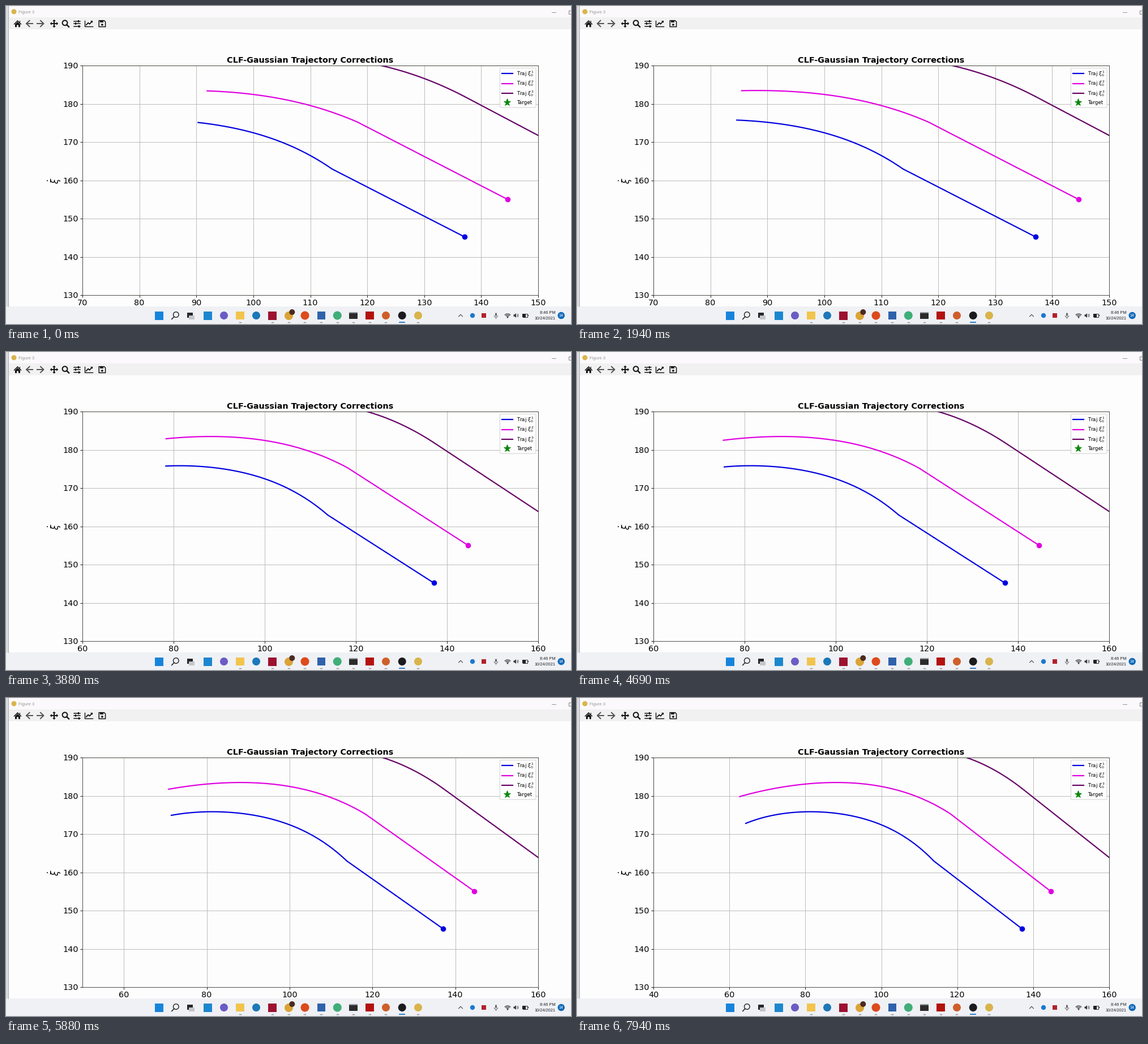
Write a matplotlib script that moves like this. It is 998x561 px and loops after 8 s.

```python
import matplotlib.pyplot as plt
import numpy as np
from matplotlib.animation import FuncAnimation
from matplotlib.patches import Arc, Circle, FancyBboxPatch, Polygon, Rectangle

W, H, DPI = 998, 561, 64
PT = 72 / DPI  # points per pixel
FRAMES, INTERVAL = 128, 62.5
BLUE, PINK, PLUM = "#0000e0", "#e000e0", "#660066"
INK = "#111111"

plt.rcParams["font.family"] = "DejaVu Sans"
fig = plt.figure(figsize=(W / DPI, H / DPI), dpi=DPI, facecolor="#fdfdfd")


def pixel_axes(z):
    a = fig.add_axes([0, 0, 1, 1], zorder=z)
    a.set_xlim(0, W)
    a.set_ylim(H, 0)
    a.axis("off")
    return a


ui, top = pixel_axes(0), pixel_axes(2)


def rect(x, y, w, h, color, a=ui):
    a.add_patch(Rectangle((x, y), w, h, fc=color, ec="none"))


def dot(x, y, r, color):
    ui.add_patch(Circle((x, y), r, fc=color, ec="none"))


def square(x, y, s, color):
    rect(x - s / 2, y - s / 2, s, s, color)


def poly(pts, color=INK):
    ui.add_patch(Polygon(pts, closed=True, fc=color, ec="none"))


def line(pts, color=INK, w=1.0, a=ui):
    xs, ys = zip(*pts)
    a.plot(xs, ys, color=color, lw=w * PT)


def ring(x, y, r, color=INK, w=1.0):
    ui.add_patch(Circle((x, y), r, fc="none", ec=color, lw=w * PT))


def label(x, y, s, size, color=INK, a=ui, **kw):
    kw.setdefault("va", "baseline")
    a.text(x, y, s, fontsize=size * PT, color=color, **kw)


def draw_window():
    rect(0, 0, 4.5, 530, "#d9dbdf")
    line([(4.5, 0), (4.5, 530)], "#a9abad", 1)
    rect(5, 0, W - 5, 20, "#fbf9fb")
    rect(5, 20, W - 5, 21, "#f2f1f2")
    dot(14, 10, 4.5, "#d9b44a")
    label(22, 13, "Figure 3", 7.6, "#9a9a9a", family="Liberation Sans")
    line([(964, 10.5), (971, 10.5)], "#8c8c8c", 0.9)
    ui.add_patch(Rectangle((994.5, 7.5), 6, 6, fc="none", ec="#777777", lw=0.9 * PT))


def draw_toolbar():
    # home
    poly([(13.5, 32), (20.5, 25), (27.5, 32), (26.5, 33), (20.5, 27.2), (14.5, 33)])
    poly([(16, 32.2), (20.5, 28), (25, 32.2), (25, 37.2), (22, 37.2),
          (22, 33.5), (19, 33.5), (19, 37.2), (16, 37.2)])
    rect(23.6, 26, 1.8, 4, INK)
    # back and forward
    for x, d in ((36, 1), (66.5, -1)):
        line([(x, 31), (x + 11 * d, 31)], "#555555", 2)
        line([(x + 5.5 * d, 25.8), (x, 31), (x + 5.5 * d, 36.2)], "#555555", 2)
    # pan
    line([(80, 31), (90, 31)], w=2)
    line([(85, 26), (85, 36)], w=2)
    for ux, uy in ((1, 0), (-1, 0), (0, 1), (0, -1)):
        poly([(85 + 7.2 * ux, 31 + 7.2 * uy),
              (85 + 4.3 * ux + 3 * uy, 31 + 4.3 * uy + 3 * ux),
              (85 + 4.3 * ux - 3 * uy, 31 + 4.3 * uy - 3 * ux)])
    # zoom
    ring(104, 29.8, 4.4, w=2)
    line([(107.5, 33.3), (111, 36.8)], w=2.4)
    # sliders
    for y, x in ((26.8, 128), (31.2, 123), (35.6, 129)):
        line([(119.8, y), (131.5, y)], w=1.5)
        rect(x - 1.3, y - 2, 2.6, 4, INK)
    # chart
    line([(139.5, 25.5), (139.5, 36.3), (153, 36.3)], w=1.4)
    line([(141.8, 33.3), (145.2, 29.6), (147.6, 31.8), (152, 27)], w=1.8)
    poly([(149.5, 25.8), (153.3, 25.8), (153.3, 29.6)])
    # save
    ui.add_patch(Polygon([(164.2, 25.7), (173.4, 25.7), (175.6, 28), (175.6, 36.6), (164.2, 36.6)],
                         closed=True, fc="none", ec=INK, lw=1.5 * PT))
    rect(166, 26, 6, 3.4, INK)
    dot(169.9, 33, 1.8, INK)


def draw_taskbar():
    rect(0, 530, W, H - 530, "#eff1f5")
    y = 546
    square(270.5, y, 15, "#1784dc")
    ring(300.3, 544.5, 4.8, "#222222", 1.4)
    line([(296.8, 548.2), (292.8, 552.4)], "#222222", 1.6)
    rect(320, 541, 10.5, 9, "#262626")
    rect(323.5, 545.5, 9.5, 7, "#c4c6ca")
    square(356.5, y, 15, "#1c87cf")
    dot(385, y, 7, "#6a5cc4")
    square(413.5, y, 14.5, "#f2c44e")
    dot(442, y, 7, "#1c78b8")
    square(470.8, y, 15, "#9c1230")
    dot(499.5, y + 0.5, 7.5, "#dba437")
    dot(505.3, 540, 5, "#4a2a22")
    dot(528, y, 7.5, "#dd4a1c")
    square(556.8, y, 14, "#2f62ab")
    dot(585.3, y, 7.5, "#3fae78")
    rect(606, 540, 15.5, 12, "#2b2b2b")
    rect(606, 540, 15.5, 2, "#8f9296")
    square(642.3, y, 14.5, "#b3120e")
    dot(671, y, 7, "#cf5f2a")
    dot(699.7, y, 7, "#1b1b1d")
    dot(728, y, 7, "#d9b44a")
    for x in (413.5, 471, 499.5, 528, 556.8, 585.3, 613.7, 642.3, 671, 728):
        line([(x - 1.5, 558), (x + 1.5, 558)], "#8a8c90", 1.4)
    line([(695.5, 558), (704, 558)], "#1a6fc4", 1.8)


def draw_tray():
    line([(799.5, 547.8), (803, 544.2), (806.5, 547.8)], "#333333", 1)
    dot(824, 546, 4.2, "#1a78d0")
    square(844, 546, 8, "#b3202c")
    # microphone
    ui.add_patch(FancyBboxPatch((864.6, 542), 1.8, 4.4, boxstyle="round,pad=0.4",
                                fc="#555555", ec="none"))
    ui.add_patch(Arc((865.5, 546), 6.4, 6.4, theta1=0, theta2=180, ec="#555555", lw=0.9 * PT))
    line([(865.5, 549.2), (865.5, 551)], "#555555", 0.9)
    # wireless
    for d in (5, 9.5, 14):
        ui.add_patch(Arc((886, 550), d, d, theta1=222, theta2=318, ec="#222222", lw=1.1 * PT))
    dot(886, 549.5, 1.1, "#222222")
    # speaker
    poly([(896.5, 544.5), (898.3, 544.5), (901, 542), (901, 550), (898.3, 547.6), (896.5, 547.6)],
         "#333333")
    for d in (4.5, 8):
        ui.add_patch(Arc((901, 546), d, d, theta1=-50, theta2=50, ec="#444444", lw=0.8 * PT))
    # battery
    ui.add_patch(Rectangle((913, 543.2), 8.2, 5.4, fc="none", ec="#222222", lw=0.9 * PT))
    rect(912.5, 542.7, 5.5, 6.3, "#222222")
    rect(921.6, 544.8, 1.1, 2.2, "#222222")
    sans = dict(family="Liberation Sans", ha="right")
    label(970.5, 542.8, "8:46 PM", 7.4, "#222222", **sans)
    label(970.5, 552.8, "10/24/2021", 7.4, "#222222", **sans)
    dot(980.7, 546, 6.2, "#0f68b8")
    label(980.7, 546, "14", 6.8, "white", family="Liberation Sans", ha="center",
          va="center_baseline")


def draw_legend():
    top.add_patch(FancyBboxPatch((874.2, 111.2), 60, 66, boxstyle="round,pad=1.8",
                                 fc=(1, 1, 1, 0.85), ec="#cccccc", lw=0.9 * PT))
    for i, (y, color) in enumerate(((119.2, BLUE), (136.8, PINK), (154.4, PLUM)), 1):
        line([(876, y), (895, y)], color, 2.2, top)
        label(902, y + 3, rf"Traj $\xi_0^{i}$", 8.8, "black", top)
    top.plot(885.5, 170, "*", color="#0a870a", ms=13.5 * PT, mec="#0a870a", mew=0.8 * PT)
    label(902, 173.2, "Target", 8.8, "black", top)


draw_window()
draw_toolbar()
draw_taskbar()
draw_tray()
draw_legend()
label(537.5, 99.7, "CLF-Gaussian Trajectory Corrections", 14.4, "black", top,
      weight="bold", ha="center")
label(86, 308, r"$\dot{\xi}$", 16.5, "black", top, rotation=90, ha="center", va="center")

ax = fig.add_axes([135 / W, 1 - 510 / H, 805 / W, 405 / H], zorder=1, facecolor="none")
ax.set_ylim(130, 190)
ax.set_yticks(range(130, 191, 10))
ax.grid(color="#b6b6b4", lw=0.9 * PT)
ax.set_axisbelow(True)
ax.tick_params(labelsize=14.4 * PT, length=3.6 * PT, width=0.9 * PT, pad=3.2 * PT)
for spine in ax.spines.values():
    spine.set_color("#3c3c34")
    spine.set_linewidth(0.9 * PT)


class Path:
    """A bent curve that runs into a straight line at its last knot."""

    def __init__(self, xs, ys, end, color):
        self.mid = np.mean(xs)
        self.coef = np.polyfit(np.array(xs) - self.mid, ys, min(4, len(xs) - 2))
        self.knee, self.end = (xs[-1], ys[-1]), end
        self.line, = ax.plot([], [], color=color, lw=2.2 * PT)
        ax.plot(*end, "o", color=color, ms=9.6 * PT, mew=0)

    def show(self, tip):
        x = np.linspace(tip, self.knee[0], 120)
        y = np.polyval(self.coef, x - self.mid)
        self.line.set_data(np.append(x, [self.knee[0], self.end[0]]),
                           np.append(y, [self.knee[1], self.end[1]]))


blue = Path([64.3, 71.5, 78.4, 81.5, 87.4, 90.4, 95, 100, 105, 110, 113.7],
            [172.8, 174.85, 175.75, 175.88, 175.55, 175.1, 174.0, 172.4, 170, 166.5, 163.05],
            (137.1, 145.2), BLUE)
pink = Path([62.66, 70.8, 75.34, 78.35, 83.66, 88.45, 91.9, 100, 105, 110, 115, 118.5],
            [179.78, 181.7, 182.47, 182.89, 183.38, 183.48, 183.36, 182.4, 181.26, 179.55,
             177.2, 175.05],
            (144.6, 155.04), PINK)
plum = Path([118, 122.4, 126.1, 130, 133, 135.1, 137],
            [191.2, 190, 188.55, 186.6, 184.8, 183.35, 181.95],
            (165, 159.95), PLUM)
plum.show(118)

KEYS = [0, 18, 39, 62, 75, 94, 127]
BLUE_TIP = [90.3, 87.3, 83.0, 78.3, 75.55, 71.45, 64.3]
PINK_TIP = [91.9, 88.45, 83.66, 78.35, 75.34, 70.8, 62.7]
HOLDS = (76, 116)  # the plot stalls just before it rescales


def limits(k):
    if k < 34:
        return 70, 150, 10
    return (60 if k < 77 else 50 if k < 117 else 40), 160, 20


def update(k):
    t = k - 1 if k in HOLDS else k
    blue.show(np.interp(t, KEYS, BLUE_TIP))
    pink.show(np.interp(t, KEYS, PINK_TIP))
    lo, hi, step = limits(k)
    ax.set_xticks(range(-(-lo // step) * step, hi + 1, step))
    ax.set_xlim(lo, hi)
    return blue.line, pink.line


ani = FuncAnimation(fig, update, frames=FRAMES, init_func=lambda: update(0),
                    interval=INTERVAL, repeat=True, repeat_delay=0, blit=False)
plt.show()
```
